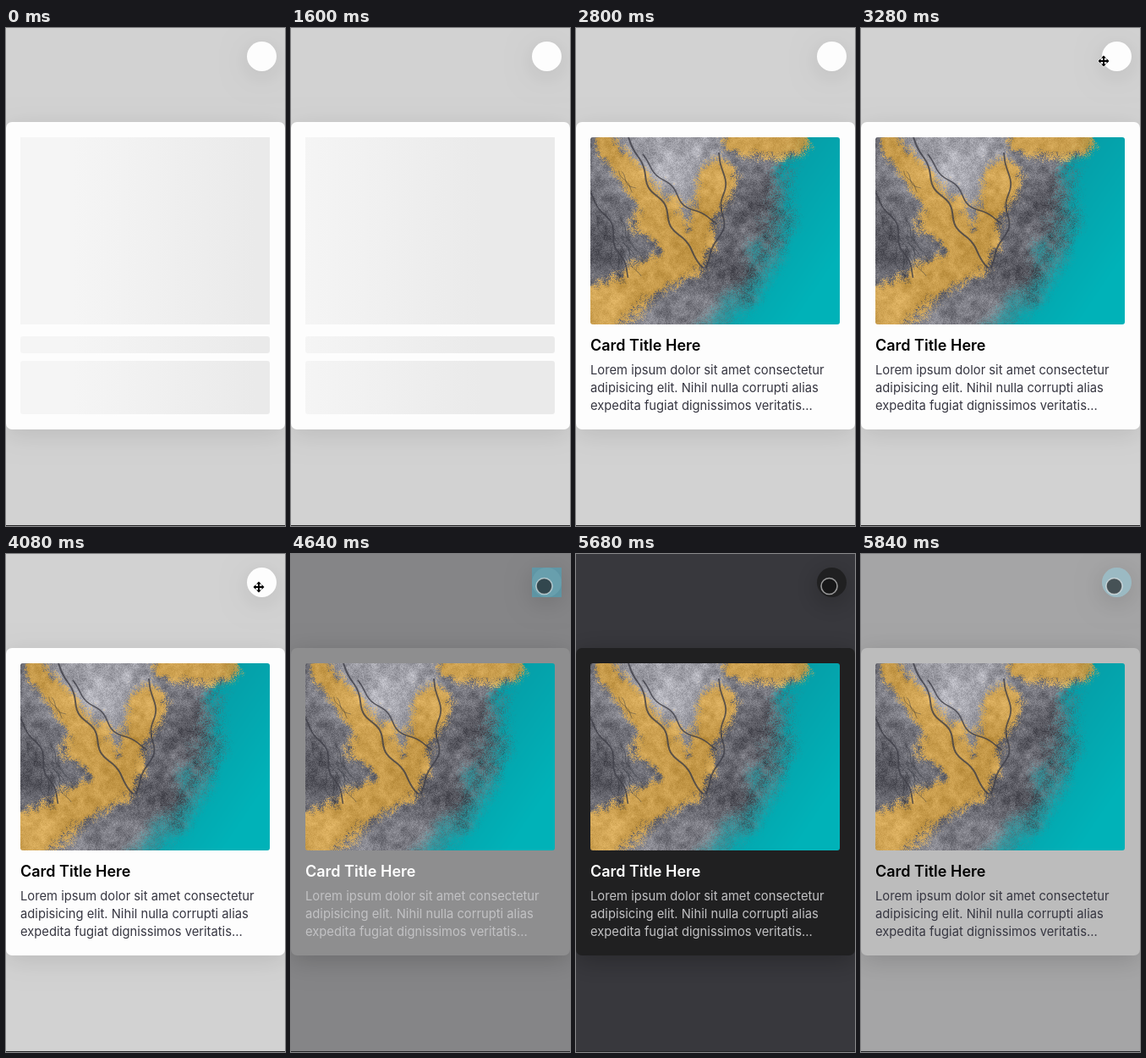
An HTML page with a canvas for the animation above (5920 ms loop, 330 by 588 pixels).

```html
<!DOCTYPE html>
<html lang="en">
<head>
<meta charset="utf-8">
<title>Card with theme switch</title>
<style>
  html, body { margin: 0; width: 100%; height: 100%; overflow: hidden; background: #d2d2d2; }
  canvas { display: block; width: 330px; height: 588px; }
</style>
</head>
<body>
<canvas id="stage" width="330" height="588"></canvas>
<script>
const W = 330, H = 588, LOOP = 5920, STEP = 80;
const LOADED = 1920, TO_DARK = 4552, TO_LIGHT = 5715, FADE = 300;
const FONT = 'Inter, "Open Sans", sans-serif';
const PIC = { x: 17, y: 129, w: 295, h: 221 };
const BUTTON = { x: 302.5, y: 33.5, r: 17.5 };
const LINES = [
  'Lorem ipsum dolor sit amet consectetur',
  'adipisicing elit. Nihil nulla corrupti alias',
  'expedita fugiat dignissimos veritatis…'
];
const ctx = document.getElementById('stage').getContext('2d');

const clamp = v => Math.max(0, Math.min(1, v));
const smooth = v => (v = clamp(v), v * v * (3 - 2 * v));
const lerp = (a, b, p) => a + (b - a) * p;
const blend = (a, b, p) => a.map((v, i) => lerp(v, b[i], p));
const mix = (a, b, p) => `rgb(${blend(a, b, p).map(Math.round).join()})`;

// cubic-bezier(.25, .1, .25, 1)
function ease(x) {
  x = clamp(x);
  const curve = (a, b, u) => 3 * a * u * (1 - u) ** 2 + 3 * b * u * u * (1 - u) + u ** 3;
  let lo = 0, hi = 1;
  for (let i = 0; i < 20; i++) {
    const mid = (lo + hi) / 2;
    if (curve(.25, .25, mid) < x) lo = mid; else hi = mid;
  }
  return curve(.1, 1, lo);
}

function hash(x, y) {
  const v = Math.sin(x * 127.1 + y * 311.7) * 43758.5453;
  return v - Math.floor(v);
}

function noise(x, y) {
  const i = Math.floor(x), j = Math.floor(y), u = smooth(x - i), v = smooth(y - j);
  return lerp(lerp(hash(i, j), hash(i + 1, j), u),
              lerp(hash(i, j + 1), hash(i + 1, j + 1), u), v);
}

// Layered noise, centred on zero.
function fbm(x, y) {
  let sum = 0;
  for (let k = 0, amp = .5; k < 4; k++, amp /= 2) sum += amp * (noise(x * 2 ** k + k * 17, y * 2 ** k) - .5);
  return sum;
}

function capsule(x, y, [x0, y0, x1, y1, r]) {
  const dx = x1 - x0, dy = y1 - y0;
  const s = clamp(((x - x0) * dx + (y - y0) * dy) / (dx * dx + dy * dy));
  return 1 - Math.hypot(x - x0 - s * dx, y - y0 - s * dy) / r;
}

const glow = (x, y, cx, cy, r) => Math.exp(-((x - cx) ** 2 + (y - cy) ** 2) / r ** 2);

// Ochre streams: start, end, radius.
const STREAMS = [
  [15, 5, 85, 95, 17],
  [80, 95, 115, 140, 34],
  [105, 145, 5, 206, 30],
  [120, 135, 150, 48, 24],
  [172, 3, 245, 5, 19]
];

// Aerial coast: grey rock, turquoise water, ochre sediment.
function terrain(x, y) {
  const n = fbm(x / 32, y / 32), fine = fbm(x / 9 + 40, y / 9), grain = hash(x, y) - .5;
  const tone = 124 + 42 * glow(x, y, 100, 30, 70) - 42 * glow(x, y, 205, 75, 55)
    - 40 * glow(x, y, 5, 120, 50) - 30 * glow(x, y, 165, 165, 40) + 45 * n + 75 * fine + 32 * grain;
  const rock = [tone, tone, tone + 8];

  const water = blend([6, 156, 166], [0, 178, 184], clamp(y / PIC.h + (x - 240) / 150));
  const shore = 240 - .0017 * y * y, reach = 26 + .22 * y;
  const wet = smooth((x - shore + 50 * n + 18 * grain) / reach + .5);

  const flow = Math.max(...STREAMS.map(s => capsule(x, y, s)));
  const silt = smooth((flow + 1.1 * n + .7 * fine + .35 * grain) * 2.6) * .92;
  const lit = 50 * n + 45 * fine + 14 * grain;
  const ochre = [208 + lit, 160 + lit, 72 + lit];
  return blend(blend(rock, water, wet), ochre, silt);
}

function meander(c, x0, y0, x1, y1, bend, width) {
  const dx = x1 - x0, dy = y1 - y0, len = Math.hypot(dx, dy);
  c.lineWidth = width;
  c.beginPath();
  for (let s = 0; s <= 1; s += .02) {
    const off = Math.sin(Math.PI * s) * (bend + 4 * Math.sin(s * len / 9 + x0));
    c.lineTo(x0 + dx * s - dy / len * off, y0 + dy * s + dx / len * off);
  }
  c.stroke();
}

function paintLandscape() {
  const pic = document.createElement('canvas');
  pic.width = PIC.w;
  pic.height = PIC.h;
  const c = pic.getContext('2d');
  const img = c.createImageData(PIC.w, PIC.h);
  for (let y = 0, i = 0; y < PIC.h; y++) {
    for (let x = 0; x < PIC.w; x++, i += 4) img.data.set([...terrain(x, y), 255], i);
  }
  c.putImageData(img, 0, 0);

  c.strokeStyle = 'rgba(62,62,70,.8)';
  meander(c, 45, 0, 135, 157, 6, 2);
  meander(c, 62, 20, 152, 104, 8, 1.6);
  meander(c, 152, 18, 135, 157, -14, 1.8);
  meander(c, 0, 65, 45, 168, -5, 1.6);
  c.strokeStyle = 'rgba(55,56,64,.5)';
  for (let i = 0; i < 12; i++) {
    const x = 45 * hash(i, 1), y = 30 + 120 * hash(i, 2);
    meander(c, x, y, x + 8 + 16 * hash(i, 3), y + 15 + 30 * hash(i, 4), 2, 1);
  }
  return pic;
}

const landscape = paintLandscape();

function roundBox(x, y, w, h, r) {
  ctx.beginPath();
  ctx.roundRect(x, y, w, h, r);
}

function disc(x, y, r) {
  ctx.beginPath();
  ctx.arc(x, y, r, 0, Math.PI * 2);
}

function shadowed(alpha, color, path) {
  ctx.save();
  ctx.shadowColor = `rgba(0,0,0,${alpha})`;
  ctx.shadowBlur = 30;
  ctx.shadowOffsetY = 6;
  ctx.fillStyle = color;
  path();
  ctx.fill();
  ctx.restore();
}

function drawSkeleton(t) {
  const left = t < 1600 ? 80 : 10;
  const g = ctx.createLinearGradient(left, 0, left + 215, 0);
  g.addColorStop(0, '#f5f5f5');
  g.addColorStop(1, '#eaeaea');
  ctx.fillStyle = g;
  for (const [y, h, r] of [[129, 221, 0], [364, 20, 3], [393, 63, 3]]) {
    roundBox(PIC.x, y, PIC.w, h, r);
    ctx.fill();
  }
}

function drawContent(dark) {
  ctx.save();
  roundBox(PIC.x, PIC.y, PIC.w, PIC.h, 3);
  ctx.clip();
  ctx.drawImage(landscape, PIC.x, PIC.y);
  ctx.restore();
  ctx.fillStyle = dark ? '#fff' : '#000';
  ctx.font = `600 18px ${FONT}`;
  ctx.fillText('Card Title Here', 17, 381);
  ctx.fillStyle = dark ? '#c2c2c4' : '#363641';
  ctx.font = `400 14.75px ${FONT}`;
  LINES.forEach((line, i) => ctx.fillText(line, 17, 409 + i * 21));
}

function drawTapGlow(t) {
  const { x, y, r } = BUTTON;
  const back = t >= TO_LIGHT;
  const alpha = back ? .24 : .42 * clamp((4880 - t) / 160);
  if (t < TO_DARK || !alpha) return;
  ctx.fillStyle = `rgba(51,181,215,${alpha})`;
  roundBox(x - r, y - r, 2 * r, 2 * r, back ? r : 0);
  ctx.fill();
}

function drawMoveCursor(x, y) {
  ctx.save();
  ctx.translate(x, y);
  for (const [color, bar, edge] of [['#fff', 4, 1], ['#000', 2, 0]]) {
    ctx.strokeStyle = ctx.fillStyle = color;
    for (let i = 0; i < 4; i++) {
      ctx.rotate(Math.PI / 2);
      ctx.fillRect(0, -bar / 2, 5, bar);
      ctx.beginPath();
      ctx.moveTo(6.5 + edge, 0);
      ctx.lineTo(3.5 - edge / 2, -3 - edge);
      ctx.lineTo(3.5 - edge / 2, 3 + edge);
      ctx.fill();
    }
  }
  ctx.restore();
}

function drawTouch() {
  disc(299.5, 38, 9.5);
  ctx.fillStyle = 'rgba(18,18,20,.62)';
  ctx.fill();
  ctx.strokeStyle = 'rgba(255,255,255,.55)';
  ctx.lineWidth = 1.6;
  ctx.stroke();
}

function drawPointer(t) {
  if (t >= 4480) return drawTouch();
  if (t < 2960) return;
  const enter = clamp((t - 2960) / 240), settle = clamp((t - 3280) / 240);
  drawMoveCursor(lerp(lerp(276, 287, enter), 299, settle), lerp(18, 39, enter));
}

function draw(t) {
  const dark = t >= TO_DARK && t < TO_LIGHT;
  const p = ease((t - TO_DARK) / FADE) - ease((t - TO_LIGHT) / FADE);
  const surface = mix([253, 253, 253], [32, 32, 33], p);
  const shade = lerp(.11, .28, p);

  ctx.fillStyle = mix([210, 210, 210], [56, 56, 61], p);
  ctx.fillRect(0, 0, W, H);
  shadowed(shade, surface, () => roundBox(0, 111, W, 363, 7));
  shadowed(shade, surface, () => disc(BUTTON.x, BUTTON.y, BUTTON.r));
  if (t < LOADED) drawSkeleton(t); else drawContent(dark);
  drawTapGlow(t);
  drawPointer(t);
  ctx.fillStyle = '#242426';
  ctx.fillRect(0, 587, W, 1);
}

const start = performance.now();
function tick() {
  const t = (performance.now() - start) % LOOP;
  draw(Math.floor(t / STEP) * STEP);
  requestAnimationFrame(tick);
}
tick();
</script>
</body>
</html>
```
